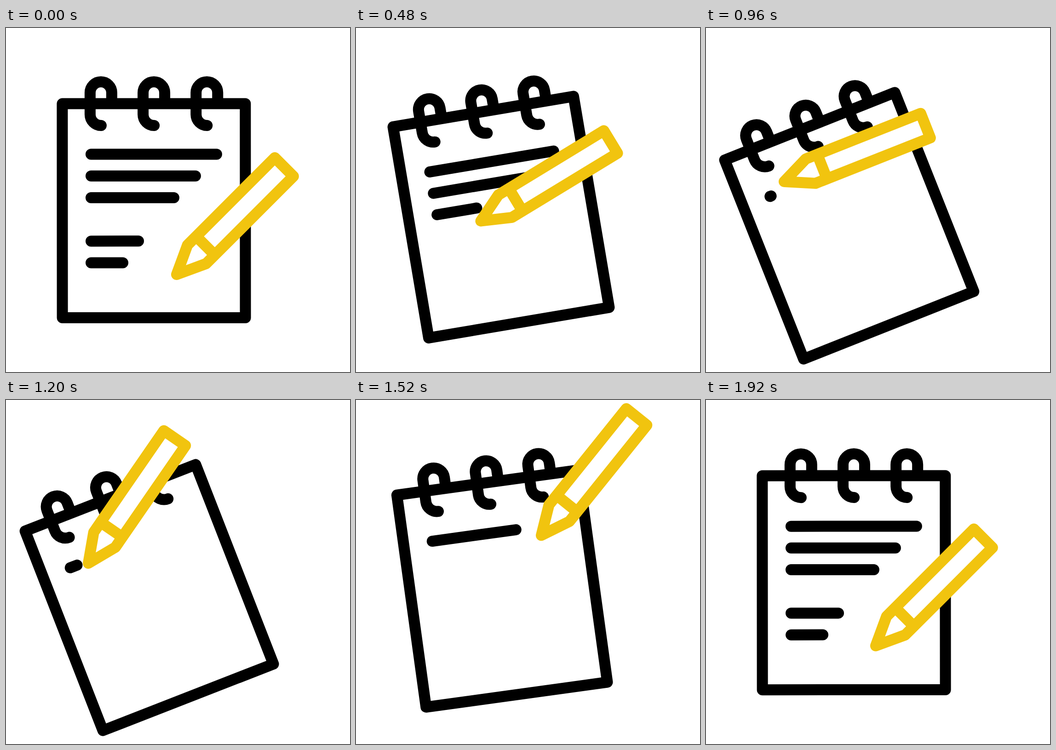
Recreate the animation shown at these times as an HTML page. Size 748 px wide and 748 px high, loop 2000 ms.

```html
<!DOCTYPE html>
<html lang="en">
<head>
<meta charset="utf-8">
<title>Notepad and pencil</title>
<style>
  html, body { margin: 0; width: 100%; height: 100%; overflow: hidden; background: #fff; }
  svg { display: block; width: 100%; height: 100%; fill: none; stroke-width: 24; stroke-linecap: round; stroke-linejoin: round; }
  #pad { stroke: #000; }
  #pencil { stroke: #f1c40f; fill: #fff; }
</style>
</head>
<body>
<svg viewBox="0 0 748 748">
  <g id="pad">
    <rect x="122.5" y="164.5" width="398" height="465.5"/>
  </g>
  <path id="pencil" d="M0 0L62 28.6H330.5V-28.6H62ZM88.7 -28.6V28.6"/>
</svg>
<script>
const LOOP = 2000, STEP = 80;
const TILT = 21.7;
const lengths = [273, 227, 180, 103, 69];

// time, tip x, tip y, angle: rest, wipe up, lift, write, return
const path = [
  [0, 371, 536, 45],
  [320, 324, 469.5, 34.7],
  [640, 218.5, 375, 28.3],
  [960, 170, 334, 21.6],
  [1200, 179, 355, 55.4],
  [1520, 403, 294.3, 51.2],
  [1920, 369, 534.5, 45]
];

const pad = document.getElementById("pad");
const pencil = document.getElementById("pencil");

function addPath(d) {
  const el = document.createElementNS("http://www.w3.org/2000/svg", "path");
  el.setAttribute("d", d);
  return pad.appendChild(el);
}

for (let i = 0; i < 3; i++) {
  addPath(`M${230 + i * 115.2} 160V140.5a23.5 23.5 0 0 0 -47 0V188a24 24 0 0 0 24 24`);
}
const strokes = lengths.map(() => addPath(""));

const sigmoid = x => 1 / (1 + Math.exp(-x));
const progress = (t, from, span) => Math.min(1, Math.max(0, (t - from) / span));

// Smooth curve through the path's points that never overshoots them
function along(t, col) {
  const slope = i => path[i] && path[i + 1]
    ? (path[i + 1][col] - path[i][col]) / (path[i + 1][0] - path[i][0]) : 0;
  const tangent = i => {
    const a = slope(i - 1), b = slope(i);
    return a * b > 0 ? 2 * a * b / (a + b) : 0;
  };
  const i = path.findLastIndex((k, n) => k[0] <= t && n < path.length - 1);
  const span = path[i + 1][0] - path[i][0];
  const p = progress(t, path[i][0], span), q = 1 - p;
  return q * q * (1 + 2 * p) * path[i][col] + p * p * (3 - 2 * p) * path[i + 1][col]
    + span * p * q * (q * tangent(i) - p * tangent(i + 1));
}

function draw(t) {
  const up = sigmoid((t - 497) / 72.6), back = sigmoid((t - 1480) / 70);
  const sag = back * (1 - back);
  pad.setAttribute("transform",
    `translate(${5.6 * sag} ${6.5 * sag}) rotate(${-TILT * (up - back)} 402 440)`);

  pencil.setAttribute("transform",
    `translate(${along(t, 1)} ${along(t, 2)}) rotate(${-along(t, 3)})`);

  // Wiped from the bottom line up, written from the top down at growing speed
  lengths.forEach((full, i) => {
    const y = 274.5 + 47.2 * (i < 3 ? i : i + 1);
    const span = 520 / (1 + 2 * i);
    const shown = 1 - progress(t, 636 - 106 * i, 109) + progress(t, 1690 + 50 * i - span, span);
    const length = Math.max(i ? 0 : 2.5, full * shown);
    strokes[i].setAttribute("d", length > 0 ? `M185 ${y}h${length}` : "");
  });
}

const start = performance.now();

function tick() {
  const t = (performance.now() - start) % LOOP;
  draw(Math.floor(t / STEP) * STEP);
  requestAnimationFrame(tick);
}
tick();
</script>
</body>
</html>
```
